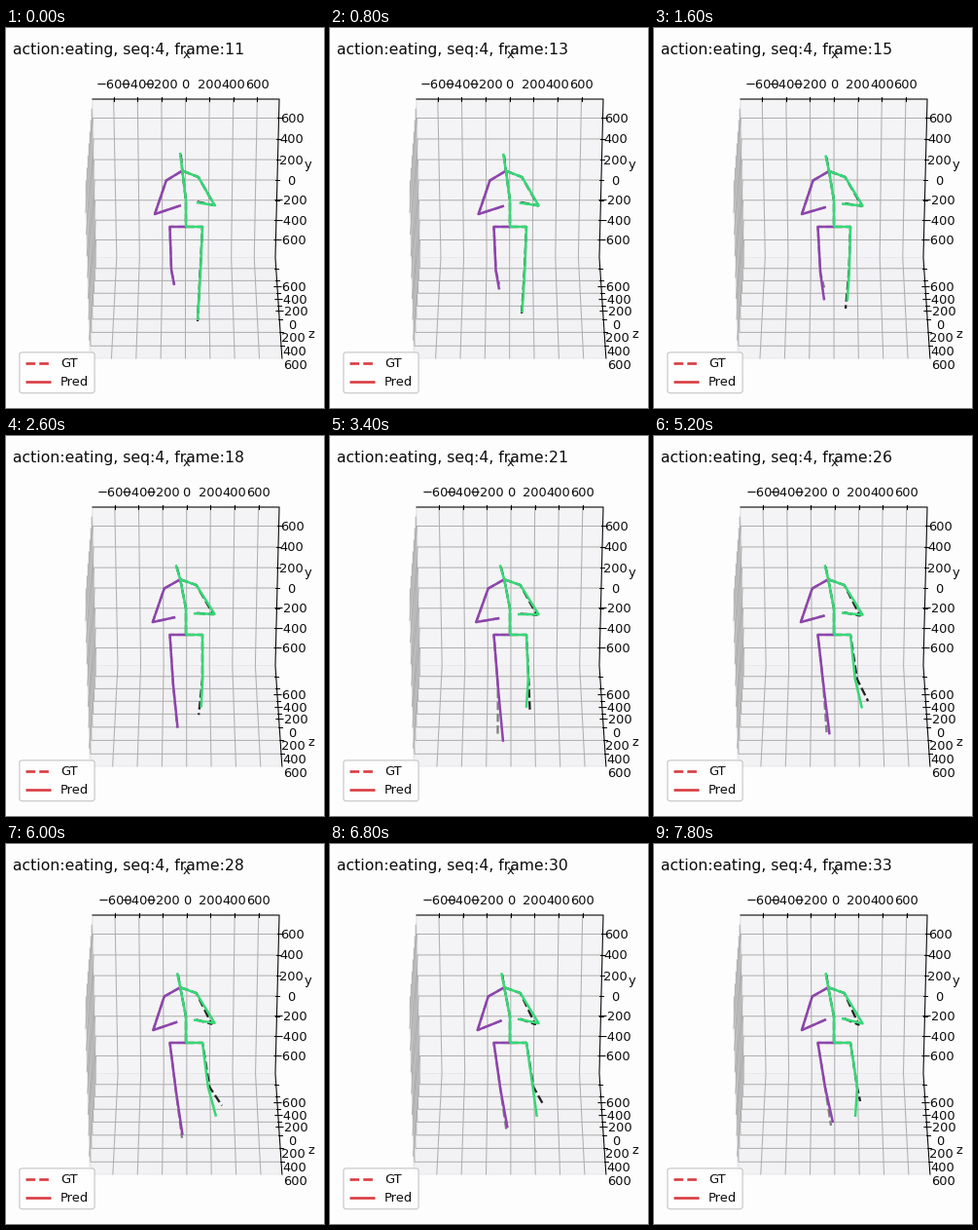
A matplotlib script that plays this animation: 327x390 px, repeating every 8000 ms.

```python
import numpy as np
import matplotlib.pyplot as plt
from matplotlib.animation import FuncAnimation
from matplotlib.patches import FancyBboxPatch, Polygon

W, H, DPI = 327, 390, 100
FRAMES, STEP = 40, 200
PT = 72 / DPI                      # points per pixel
LIM = 780                          # axis half range
TICKS = range(-600, 601, 200)
FIRST, LAST = 11, 33               # counter range
GREEN, PURPLE, RED = "#35d876", "#8e44ad", "#d93a3e"
BLACK, GREY, GRID, INK = "#222222", "#808080", "#b0b0b0", "#0c0c0c"

plt.rcParams["font.family"] = "DejaVu Sans"
fig = plt.figure(figsize=(W / DPI, H / DPI), dpi=DPI, facecolor="#fefdfe")
ax = fig.add_axes([0, 0, 1, 1])
ax.set_xlim(0, W)
ax.set_ylim(H, 0)
ax.axis("off")


def project(u, v, d):
    """Box point to pixels: u -1..1 across, v 0..1 down, d 0..1 to the front."""
    w = 1 + 0.044 * v - 0.073 * d
    return 185 + 96 * u / w, (73 + 172.9 * v + 83.3 * d) / w


def path(*points):
    return np.array([project(*p) for p in points]).T


def stroke(pts, color=GRID, width=1.04, z=1, **kw):
    return ax.plot(pts[0], pts[1], color=color, lw=width * PT, zorder=z, **kw)[0]


def label(x, y, s, size=13.04, ha="center"):
    return ax.text(x, y, s, fontsize=size * PT, ha=ha, va="baseline",
                   color=INK, zorder=8)


def name(value):
    return str(value).replace("-", "\u2212")


# panes
for corners, shade in (
    ([(-1, 0, 0), (1, 0, 0), (1, 1, 0), (-1, 1, 0)], "#f4f3f5"),
    ([(-1, 1, 0), (1, 1, 0), (1, 1, 1), (-1, 1, 1)], "#f2f1f3"),
    ([(-1, 0, 0), (-1, 1, 0), (-1, 1, 1), (-1, 0, 1)], "#f0f0f0"),
):
    ax.add_patch(Polygon(path(*corners).T, fc=shade, ec="#e8e8e8", lw=0.6, zorder=0))

# fixed grid lines, ticks and their labels
for t in TICKS:
    v, d = (LIM - t) / (2 * LIM), (t + LIM) / (2 * LIM)
    stroke(path((-1, v, 1), (-1, v, 0), (1, v, 0)))
    stroke(path((-1, 0, d), (-1, 1, d), (1, 1, d)))
    for (x, y), drop in ((project(1, v, 0), 0), (project(1, 1, d), 18.6)):
        stroke(((x - 1.5, x + 2.5), (y, y)), "black", z=3)
        label(x + 14.2, y + drop + 4.6, name(t))
stroke(path((-1, 0, 0), (1, 0, 0), (1, 1, 0), (1, 1, 1)), "black", z=3)
label(185, 31, "x")
label(310.5, 144, "y")
label(314, 318, "z")
title = label(7, 27, "", 15.65, "left")

# legend
ax.add_patch(FancyBboxPatch((16.5, 335.5), 72, 36.5,
                            boxstyle="round,pad=2.6,rounding_size=2.6",
                            fc=(1, 1, 1, 0.8), ec="#cccccc", lw=0.94, zorder=6))
for y, s, style in ((343.6, "GT", "--"), (362.6, "Pred", "-")):
    stroke(((20, 46), (y, y)), RED, 2.6, 7, ls=style, dash_capstyle="butt",
           solid_capstyle="butt")
    label(56, y + 4.2, s, ha="left")

# grid lines and labels that follow the horizontal centre
x_items = [(t, stroke(((), ())), stroke(((), ()), "black", z=3),
            label(0, 61.7, name(t))) for t in TICKS]

LEFT = ["neck", "l_shoulder", "l_elbow", "l_wrist"], ["pelvis", "l_hip", "l_knee", "l_foot"]
RIGHT = (["head", "neck", "spine", "pelvis"],
         ["neck", "r_shoulder", "r_elbow", "r_wrist"],
         ["pelvis", "r_hip", "r_knee", "r_foot"])


def limbs(left, right, width, z, **kw):
    return [(chain, stroke(((), ()), color, width, z, solid_joinstyle="round",
                           solid_capstyle="butt", **kw))
            for chains, color in ((LEFT, left), (RIGHT, right)) for chain in chains]


true_limbs = limbs(GREY, BLACK, 2.3, 4, ls="--")
pred_limbs = limbs(PURPLE, GREEN, 2.5, 5)


def ease(s):
    s = min(max(s, 0), 1)
    return s * s * (3 - 2 * s)


def glide(s, *keys):
    """Eased motion through a few (time, value) points."""
    for (t0, a), (t1, b) in zip(keys, keys[1:]):
        if s <= t1:
            break
    return a + (b - a) * ease((s - t0) / (t1 - t0))


def there_back(s, start, peak, end, turn=0.45):
    return glide(s, (0, start), (turn, peak), (1, end))


def bump(s, centre, width):
    return np.exp(-((s - centre) / width) ** 2)


def predicted(s):
    lean = ease(s / 0.32)
    nx = 181.3 - 2.1 * lean
    return {
        "head": (there_back(s, 179, 174.7, 176.5, 0.32), 128 + 4.3 * lean),
        "neck": (nx, 146.5 + 0.7 * lean),
        "spine": (185, 177),
        "pelvis": (185, 204),
        "l_shoulder": (nx - 16.5, 156.5),
        "l_elbow": (there_back(s, 153, 150.3, 152), 191),
        "l_wrist": (there_back(s, 180, 174, 177, 0.35), there_back(s, 182, 187, 180)),
        "l_hip": (168.5, 204),
        "l_knee": (170 + 6 * s, there_back(s, 248, 257, 250)),
        "l_foot": (173 + 11 * s, there_back(s, 264, 315, 286, 0.5)),
        "r_shoulder": (nx + 16.5, 153),
        "r_elbow": (214.5, 182 + 2.3 * s),
        "r_wrist": (there_back(s, 196, 193, 193, 0.2), there_back(s, 179, 183, 179)),
        "r_hip": (202, 204),
        "r_knee": (200 + 9 * ease(s), 249.5),
        "r_foot": (glide(s, (0, 197), (0.4, 201), (0.77, 216), (1, 207)),
                   there_back(s, 300, 278.5, 280, 0.22)),
    }


def measured(s, p):
    """The same body with small deviations, largest at the feet."""
    shift = lambda joint, dx, dy: (p[joint][0] + dx, p[joint][1] + dy)
    return {
        **p,
        "head": shift("head", 0.8, 2),
        "l_foot": (p["l_foot"][0] - 9 * bump(s, 0.545, 0.13) - 2 * ease(s * 4 - 3),
                   glide(s, (0, 263), (0.14, 263), (0.38, 306), (0.7, 304), (1, 289))),
        "r_elbow": shift("r_elbow", -4 * s, 1.2 * s),
        "r_wrist": shift("r_wrist", 0.8, -0.6),
        "r_knee": shift("r_knee", 2.3 * bump(s, 0.68, 0.2) - 0.3, 0),
        "r_foot": (glide(s, (0, 197), (0.25, 197), (0.77, 222), (1, 212)),
                   there_back(s, 301, 288, 264, 0.18)),
    }


def update(i):
    n = FIRST + (i * STEP + 100) // 350
    s = (n - FIRST) / (LAST - FIRST)
    title.set_text(f"action:eating, seq:4, frame:{n}")
    drift = there_back(s, -0.5, 1, 0.8) / 96
    for t, line, tick, text in x_items:
        u = t / LIM + drift
        line.set_data(*path((u, 0, 0), (u, 1, 0), (u, 1, 1)))
        x, y = project(u, 0, 0)
        tick.set_data((x, x), (y - 1.8, y + 1.5))
        text.set_x(x)
    pred = predicted(s)
    for group, joints in ((pred_limbs, pred), (true_limbs, measured(s, pred))):
        for chain, line in group:
            line.set_data(*zip(*(joints[j] for j in chain)))
    return []


anim = FuncAnimation(fig, update, frames=FRAMES, interval=STEP,
                     init_func=lambda: update(0), repeat=True, repeat_delay=0)
plt.show()
```
